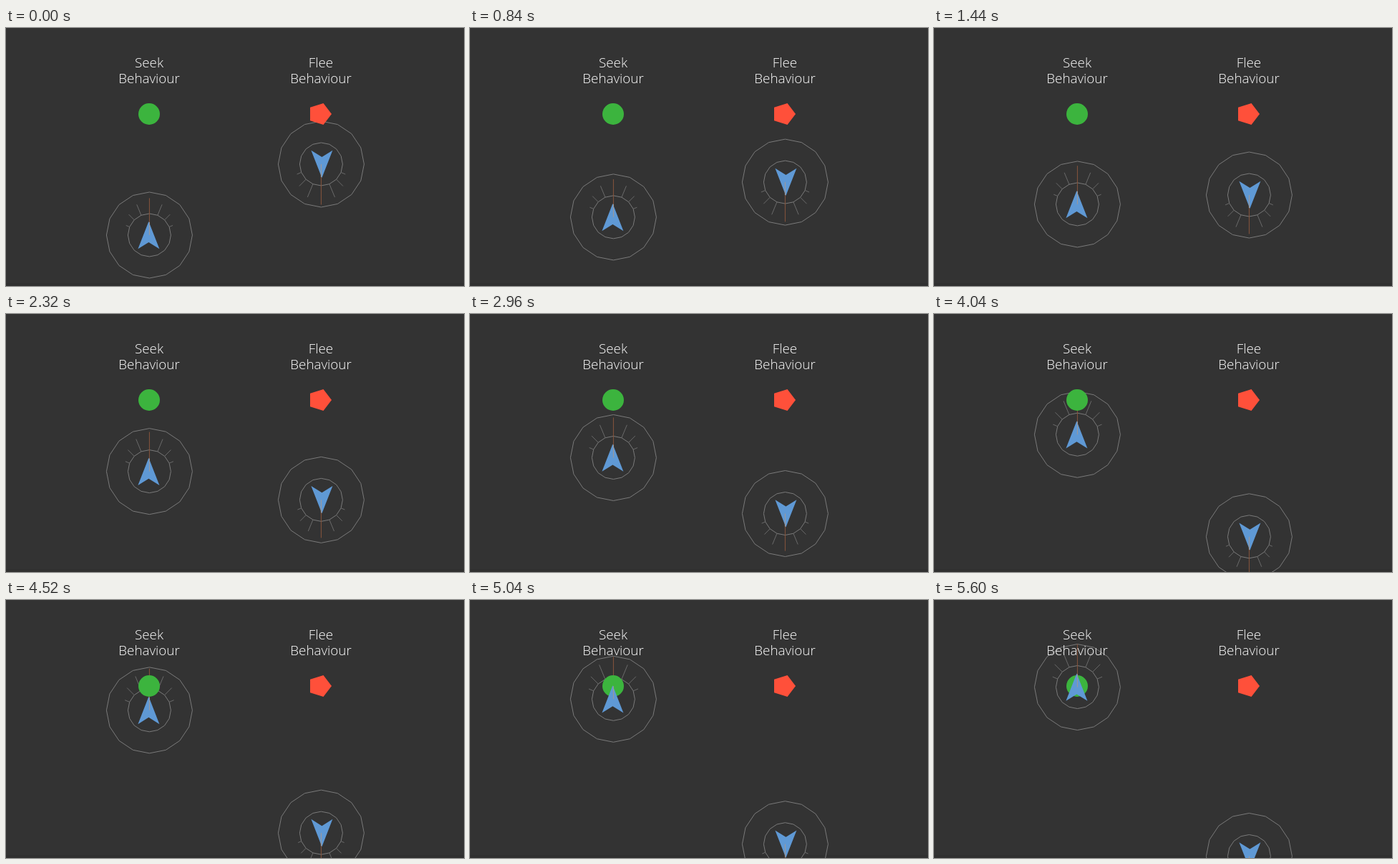
An HTML page with a canvas that plays this animation: 640 by 360 pixels, repeating every 5640 ms.

```html
<!DOCTYPE html>
<html lang="en">
<head>
<meta charset="utf-8">
<title>Seek and Flee</title>
<style>
html, body { margin: 0; width: 100%; height: 100%; overflow: hidden; background: #333; }
canvas { display: block; }
</style>
</head>
<body>
<canvas id="stage" width="640" height="360"></canvas>
<script>
const ctx = document.getElementById('stage').getContext('2d');
const LOOP = 5640, STEP = 40, SPEED = 0.0299;
const SIDES = 16, INNER = 30, OUTER = 60, TARGET_Y = 120;

function trace(points) {
  ctx.beginPath();
  points.forEach(([x, y]) => ctx.lineTo(x, y));
  ctx.closePath();
}

function fill(points, color) {
  trace(points);
  ctx.fillStyle = color;
  ctx.fill();
}

function line(x1, y1, x2, y2, color) {
  ctx.beginPath();
  ctx.moveTo(x1, y1);
  ctx.lineTo(x2, y2);
  ctx.strokeStyle = color;
  ctx.stroke();
}

function ring(x, y, r) {
  trace(Array.from({ length: SIDES }, (_, i) => {
    const a = i * 2 * Math.PI / SIDES;
    return [x + r * Math.sin(a), y - r * Math.cos(a)];
  }));
  ctx.strokeStyle = '#7a7a7a';
  ctx.stroke();
}

// Interest rays fade linearly with angle and shrink with distance.
function sensors(x, y, dir) {
  const reach = 30 * (1 - Math.abs(y - TARGET_Y) / 600);
  ring(x, y, INNER);
  ring(x, y, OUTER);
  for (let i = -3; i <= 3; i++) {
    if (!i) continue;
    const a = i * Math.PI / 8;
    const sx = Math.sin(a), sy = dir * Math.cos(a);
    const r = INNER + reach * (1 - Math.abs(i) / 4);
    line(x + sx * INNER, y + sy * INNER, x + sx * r, y + sy * r, '#6a6a6a');
  }
  line(x, y, x, y + dir * (INNER + reach), '#88563d');
}

function arrow(x, y, dir) {
  const cx = x + dir;
  fill([[cx, y + dir * 19], [cx + 15, y - dir * 19.3],
    [cx, y - dir * 10], [cx - 15, y - dir * 19.3]], '#5f99d5');
  line(x, y, x, y + dir * 18, '#a39a94');
}

function label(word, x) {
  ctx.fillText(word, x, 55);
  ctx.fillText('Behaviour', x, 77);
}

function draw(t) {
  ctx.fillStyle = '#333';
  ctx.fillRect(0, 0, 640, 360);
  ctx.fillStyle = '#303030';
  ctx.fillRect(0, 356, 640, 4);

  const moved = SPEED * t;
  const seekY = 289 - moved, fleeY = 190 + moved;
  ctx.lineWidth = 1;
  sensors(200.4, seekY, -1);
  sensors(440.4, fleeY, 1);

  ctx.fillStyle = '#fff';
  ctx.font = '300 18.8px "Open Sans", sans-serif';
  ctx.textAlign = 'center';
  label('Seek', 200);
  label('Flee', 440);

  ctx.beginPath();
  ctx.arc(200, TARGET_Y, 15, 0, 2 * Math.PI);
  ctx.fillStyle = '#3cb43e';
  ctx.fill();
  fill([[455, 120], [443.5, 105], [425, 110.7], [425, 129.3], [443.5, 135]], '#ff503a');

  arrow(200.4, seekY, -1);
  arrow(440.4, fleeY, 1);
}

function tick() {
  const t = performance.now() % LOOP;
  draw(Math.floor(t / STEP) * STEP);
  requestAnimationFrame(tick);
}
tick();
</script>
</body>
</html>
```
